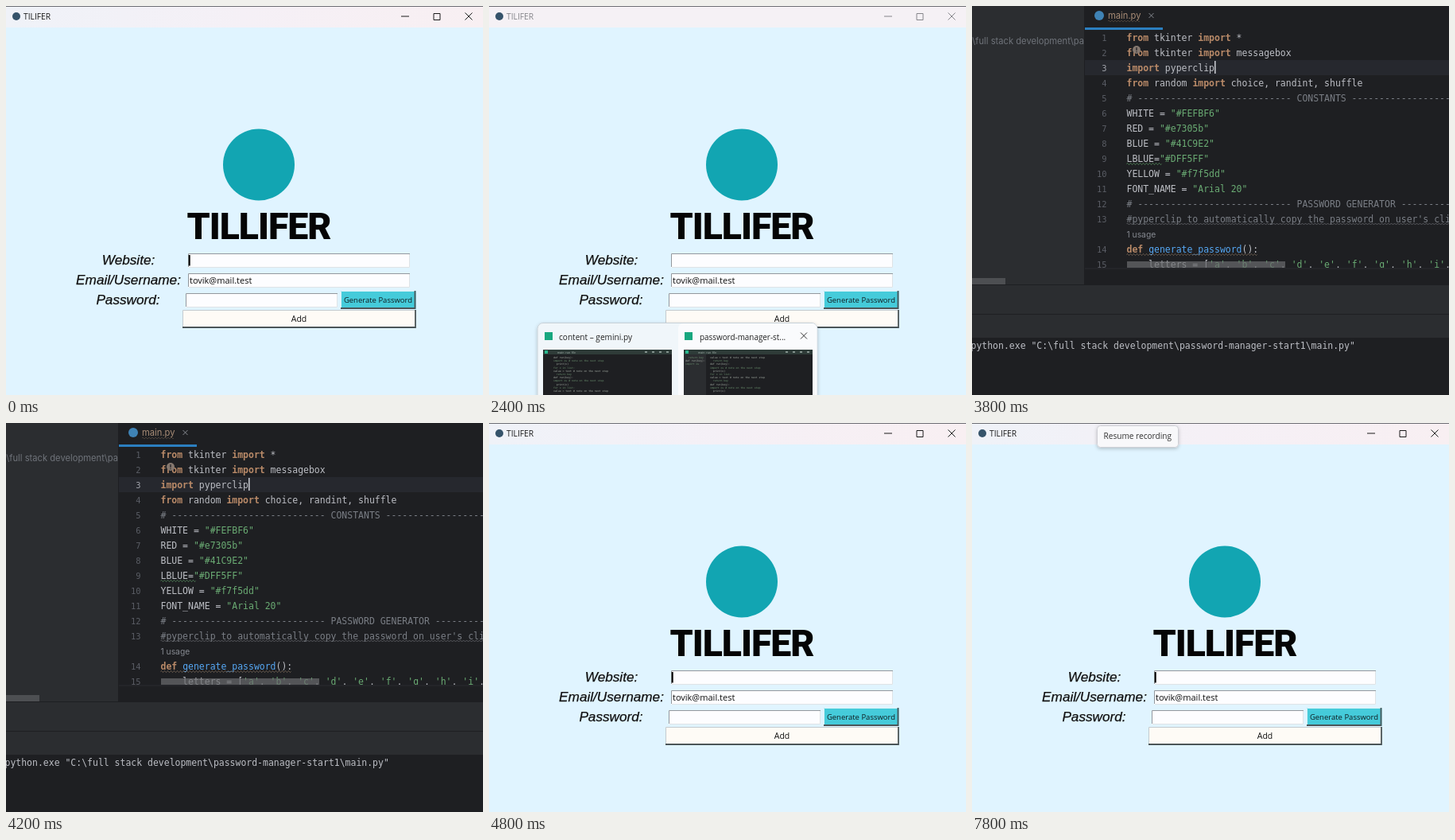
An HTML page that plays this animation: 600 by 489 pixels, repeating every 8 s.

```html
<!DOCTYPE html>
<html lang="en">
<head>
<meta charset="utf-8">
<title>Password manager demo</title>
<style>
  html, body { margin: 0; width: 100%; height: 100%; overflow: hidden; background: #e0f4ff; }
  svg { display: block; width: 100%; height: 100%; }
  text { white-space: pre; }
  .ui { font-family: "Open Sans", "Noto Sans", sans-serif; }
  .label { font: italic 17.2px "Liberation Sans", Arial, sans-serif; stroke: #111; stroke-width: .25px; }
  .brand { font: 900 46.4px Roboto, sans-serif; letter-spacing: -1px; }
  .ide { font-family: Inter, sans-serif; }
  .code { font: 11.48px "DejaVu Sans Mono", monospace; }
  .kw { fill: #b98a68; font-weight: bold; }
  .str { fill: #6aab73; }
  .com { fill: #7a7e85; }
  .fn { fill: #56a8f5; }
</style>
</head>
<body>
<svg id="stage" viewBox="0 0 600 489" preserveAspectRatio="none"></svg>
<script>
const LOOP = 8000;
const stage = document.getElementById('stage');

const esc = s => s.replace(/&/g, '&amp;').replace(/</g, '&lt;');
const rect = (x, y, w, h, fill, extra = '') =>
  `<rect x="${x}" y="${y}" width="${w}" height="${h}" fill="${fill}" ${extra}/>`;
const path = (d, stroke, width = 1) =>
  `<path d="${d}" fill="none" stroke="${stroke}" stroke-width="${width}"/>`;
const dot = (x, y, r, fill) => `<circle cx="${x}" cy="${y}" r="${r}" fill="${fill}"/>`;
const text = (x, y, s, cls, fill, size, anchor = 'start') =>
  `<text x="${x}" y="${y}" class="${cls}" fill="${fill}" text-anchor="${anchor}"` +
  `${size ? ` style="font-size:${size}px"` : ''}>${esc(s)}</text>`;
const group = (id, body) => `<g id="${id}">${body}</g>`;
const cross = (x, y, r, color) =>
  path(`M${x - r} ${y - r}l${2 * r} ${2 * r}m0 ${-2 * r}l${-2 * r} ${2 * r}`, color);
const wave = (x, y, w, color) =>
  path(`M${x} ${y}` + 'q1 -2 2 0t2 0'.repeat(Math.round(w / 4)), color, .8);

// ---- password manager window ----
const entry = (x, y, w) =>
  rect(x, y, w, 18, '#fdfdff') +
  path(`M${x + .5} ${y + 17}V${y + .5}H${x + w}`, '#93989d') +
  path(`M${x + 1} ${y + 17.5}H${x + w - .5}V${y + 1}`, '#dfe3e6');

const button = (x, y, w, h, fill, edge) =>
  rect(x, y, w, h, fill) +
  path(`M${x + .5} ${y + h}V${y + .5}H${x + w}`, edge) +
  path(`M${x} ${y + h - 1}H${x + w - 1}V${y}`, '#4b5558', 1.8);

const controls = color =>
  path('M497 13H507M538 9.5h8v8h-8z', color) + cross(582, 13, 4.5, color);

const titleBar = (id, fill, color) => group(id,
  rect(0, 0, 600, 27, fill) + rect(0, 0, 600, 1, '#6d6e74') +
  dot(13, 13, 5, '#35536a') +
  text(22, 17, 'TILIFER', 'ui', color, 10.3) + controls(color));

const form =
  rect(0, 0, 600, 489, '#e0f4ff') +
  dot(318, 199.5, 45, '#12a5b2') +
  text(318, 293, 'TILLIFER', 'brand', '#050505', 0, 'middle') +
  text(154, 325, 'Website:', 'label', '#111', 0, 'middle') +
  text(154, 350, 'Email/Username:', 'label', '#111', 0, 'middle') +
  text(153.5, 375, 'Password:', 'label', '#111', 0, 'middle') +
  entry(229, 311, 279) + entry(229, 336, 279) + entry(226, 361, 191) +
  text(231, 349, 'tovik@mail.test', 'ui', '#111', 11) +
  button(421, 358, 94.5, 23, '#45cbda', '#d5f3f8') +
  text(468, 373, 'Generate Password', 'ui', '#101c20', 9.5, 'middle') +
  button(222, 382, 294, 23, '#fefbf6', '#c3cbcf') +
  text(368.5, 397, 'Add', 'ui', '#111', 10.5, 'middle');

// ---- taskbar previews ----
const snippets = ['import os', 'def run(key):', '  return key', 'value = text', 'for x in list:', '  print(x)'];

function miniCode(x, y, rows, seed, note = ' # note on the next step') {
  let out = '';
  for (let i = 0; i < rows; i++) {
    const n = (i * 5 + seed) % 6;
    out += text(x, y + i * 4.2, snippets[n] + (n % 3 ? '' : note), 'code', n % 2 ? '#a8b0a8' : '#6f9673', 3.2);
  }
  return out;
}

const thumb = x =>
  rect(x, 432, 162, 57, '#1e1f22') + rect(x, 432, 162, 6, '#2e3b38') +
  rect(x + 2, 433, 4, 4, '#28b68b') +
  text(x + 18, 437, 'main  run  file', 'ui', '#a9b7b1', 3.6) +
  [128, 137, 146, 155].map(d => rect(x + d, 434, 3, 2, '#82918c')).join('');

const previews =
  rect(61, 398.5, 352, 100, '#f0f6fa', 'rx="7" stroke="#c8d2d9" filter="url(#shadow)"') +
  rect(238, 399, 174.5, 100, '#fafbfd', 'rx="6"') +
  rect(70, 410, 10, 10, '#18a77f') + rect(246, 410, 10, 10, '#18a77f') +
  text(88, 419.5, 'content – gemini.py', 'ui', '#222', 10.1) +
  text(265, 419.5, 'password-manager-st...', 'ui', '#222', 9.9) +
  cross(396, 414.5, 4, '#333') +
  thumb(68) + miniCode(81, 443, 11, 1) +
  thumb(245) + rect(245, 438, 28, 51, '#2b2d30') +
  miniCode(247, 443, 3, 2, '') + miniCode(278, 443, 11, 3);

// ---- editor ----
const CH = 6.91, LEFT = 194.5, rowY = i => 43.5 + i * 19.06;
const span = (cls, s) => `<tspan class="${cls}">${esc(s)}</tspan>`;
const K = s => span('kw', s), S = s => span('str', s);
const C = s => span('com', s), F = s => span('fn', s);
const banner = (name, n) => C(`# ${'-'.repeat(28)} ${name} ${'-'.repeat(n)}`);
const letters = [...'abcdefghi'].map(c => S(`'${c}'`)).join(', ');

const lines = [
  K('from') + ' tkinter ' + K('import') + ' *',
  K('from') + ' tkinter ' + K('import') + ' messagebox',
  K('import') + ' pyperclip',
  K('from') + ' random ' + K('import') + ' choice, randint, shuffle',
  banner('CONSTANTS', 20),
  'WHITE = ' + S('"#FEFBF6"'),
  'RED = ' + S('"#e7305b"'),
  'BLUE = ' + S('"#41C9E2"'),
  'LBLUE=' + S('"#DFF5FF"'),
  'YELLOW = ' + S('"#f7f5dd"'),
  'FONT_NAME = ' + S('"Arial 20"'),
  banner('PASSWORD GENERATOR', 10),
  C("#pyperclip to automatically copy the password on user's clipboard"),
  null,
  K('def') + ' ' + F('generate_password') + '():',
  '    letters = [' + letters + ','
];

let number = 0;
const listing = lines.map((line, i) => {
  const y = rowY(i);
  if (line === null) return text(LEFT, y, '1 usage', 'ide', '#868a91', 10.3);
  number++;
  return `<text x="${LEFT}" y="${y}" class="code" fill="#bcbec4">${line}</text>` +
    text(169.5, y, String(number), 'code', number === 3 ? '#a1a3ab' : '#5a5d65', 10.4, 'end');
}).join('');

const editor =
  rect(0, 0, 600, 489, '#1e1f22') +
  rect(0, 0, 141, 350, '#2b2d30') +
  text(141, 48, '\\full stack development\\pa', 'ide', '#6f737a', 11.2, 'end') +
  rect(0, 342, 42, 8, '#4d4f52') +
  dot(160, 12, 6, '#3f83b5') +
  text(171, 16, 'main.py', 'ide', '#a88c76', 11.2) + wave(171, 19, 41, '#54483f') +
  cross(225.5, 12, 3, '#868a91') +
  rect(142, 68, 458, 19, '#26282e') +
  `<g clip-path="url(#codeArea)">` + listing +
  wave(LEFT, 198.5, 42, '#5f9f68') + wave(LEFT, 274, 406, '#65686c') +
  wave(LEFT, 312.5, 165, '#8a7560') + '</g>' +
  rect(195, 321, 199, 8, '#6b6d70', 'opacity=".7"') +
  dot(207, 55, 5, '#85786f') + rect(206.4, 52, 1.2, 4, '#1e1f22') + rect(206.4, 57, 1.2, 1.2, '#1e1f22') +
  rect(142, 329.5, 458, 1, '#2b2d30') +
  rect(0, 350, 600, 67, '#2b2d30') + rect(0, 350, 600, 1, '#1e1f22') + rect(0, 387, 600, 1, '#1e1f22') +
  text(-1.5, 431, 'python.exe "C:\\full stack development\\password-manager-start1\\main.py"', 'code', '#bcbec4') +
  rect(142, 27, 98, 3, '#4a4d52') +
  group('focusBar', rect(142, 27, 98, 3, '#2b7fc0')) +
  group('editCaret', rect(LEFT + 16 * CH, 69, 1.5, 16, '#ced0d6'));

const tooltip =
  rect(157.5, 3.5, 102, 27, '#f8f8fa', 'rx="4" stroke="#cfd0d6" filter="url(#shadow)"') +
  text(165.5, 20, 'Resume recording', 'ui', '#333', 10.1);

stage.innerHTML = `<defs>
  <linearGradient id="bar"><stop stop-color="#eff2f8"/><stop offset=".5" stop-color="#f5f0f6"/>
    <stop offset="1" stop-color="#f8eff2"/></linearGradient>
  <filter id="shadow" x="-10%" y="-30%" width="120%" height="170%">
    <feDropShadow dx="0" dy="1.5" stdDeviation="2" flood-opacity=".22"/></filter>
  <clipPath id="codeArea"><path d="M142 0H600V329H142z"/></clipPath></defs>` +
  group('app', form + titleBar('active', 'url(#bar)', '#1a1a1a') +
    titleBar('inactive', '#f5f1f5', '#85858a') +
    group('formCaret', rect(229.7, 313, 2, 13.5, '#000')) +
    group('previews', previews) + group('tooltip', tooltip)) +
  group('editor', editor);

const parts = {};
for (const id of ['app', 'active', 'inactive', 'formCaret', 'previews', 'tooltip', 'editor', 'focusBar', 'editCaret'])
  parts[id] = document.getElementById(id);
const show = (id, on) => parts[id].setAttribute('display', on ? 'inline' : 'none');
const within = (t, a, b) => t >= a && t < b;

function draw(t) {
  const inEditor = within(t, 2600, 4800);
  const blurred = within(t, 1400, 2600);
  const focused = within(t, 2800, 4400);
  const since = t < 2600 ? t : t - 4800;
  show('app', !inEditor);
  show('editor', inEditor);
  show('active', !blurred);
  show('inactive', blurred);
  show('formCaret', !blurred && since % 900 < 600);
  show('previews', within(t, 1200, 2600));
  show('tooltip', t >= 7600);
  show('focusBar', focused);
  show('editCaret', focused && (t - 2800) % 1000 < 500);
}

const start = performance.now();
function tick() {
  draw((performance.now() - start) % LOOP);
  requestAnimationFrame(tick);
}
tick();
</script>
</body>
</html>
```
